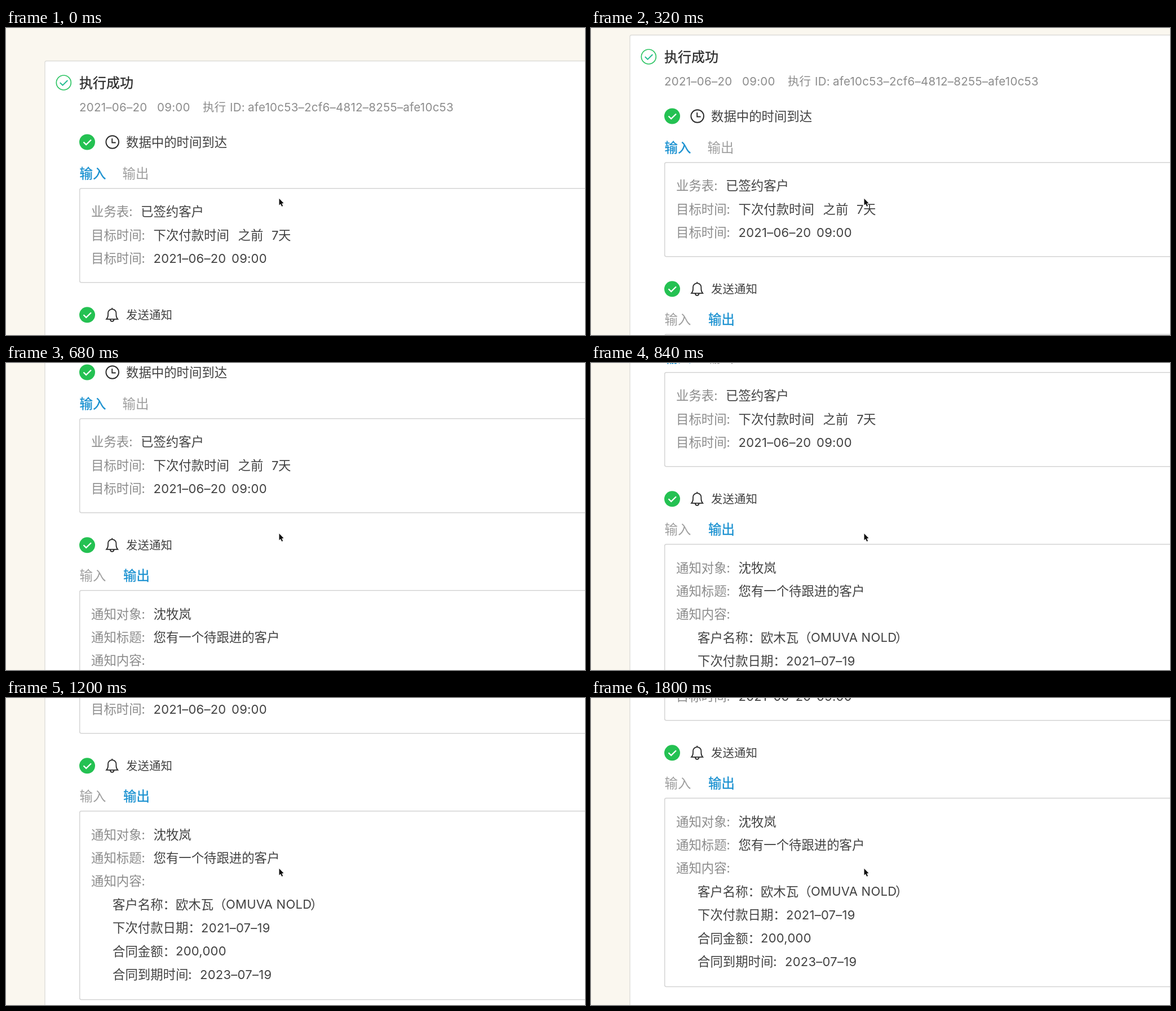
An HTML page with a canvas for the animation above (1840 ms loop, 1027 by 545 pixels).

```html
<!DOCTYPE html>
<html lang="zh-CN">
<head>
<meta charset="utf-8">
<title>执行成功</title>
<style>
html, body { margin: 0; width: 100%; height: 100%; overflow: hidden; background: #faf7ef; }
canvas { display: block; }
</style>
</head>
<body>
<canvas id="stage" width="1027" height="545"></canvas>
<script>
const W = 1027, H = 545, LOOP = 1840, STEP = 40;
const ctx = document.getElementById('stage').getContext('2d');
const HAN = '"Noto Sans CJK SC", "Noto Sans CJK", sans-serif';
const LATIN = 'Inter, "Open Sans", sans-serif';
const INK = '#424242', GRAY = '#8c8c8c', PALE = '#9f9f9f', BLUE = '#1890d0';
const GREEN = '#24c152', LINE = '#d4d4d4', PAPER = '#faf7ef';
const SMALL = 20.5;

// Scroll keys: time, offset, speed
const KEYS = [
  [0, 0, 0], [320, 46, 0.22], [520, 108, 0.41],
  [840, 268, 0.45], [1040, 346, 0.32], [1400, 412, 0]
];

function scrollAt(t) {
  for (let i = 1; i < KEYS.length; i++) {
    const [t0, p0, v0] = KEYS[i - 1], [t1, p1, v1] = KEYS[i];
    if (t > t1) continue;
    const d = t1 - t0, u = (t - t0) / d, u2 = u * u, u3 = u2 * u;
    return Math.round(p0 + (p1 - p0) * (3 * u2 - 2 * u3)
      + d * (v0 * (u3 - 2 * u2 + u) + v1 * (u3 - u2)));
  }
  return KEYS[KEYS.length - 1][1];
}

// y is the middle of the text line
function han(str, x, y, color = INK, size = 22.4, heavy = false) {
  ctx.font = `350 ${size}px ${HAN}`;
  ctx.letterSpacing = '0px';
  ctx.fillStyle = color;
  const base = y + size * 0.375;
  ctx.fillText(str, x, base);
  if (!heavy) return;
  ctx.strokeStyle = color;
  ctx.lineWidth = 0.35;
  ctx.strokeText(str, x, base);
}

function latin(str, x, y, color = INK, size = 22) {
  ctx.font = `400 ${size}px ${LATIN}`;
  ctx.letterSpacing = '0.25px';
  ctx.fillStyle = color;
  ctx.fillText(str, x, y + size * 0.366);
}

function line(points, color, width) {
  ctx.beginPath();
  points.forEach(([x, y]) => ctx.lineTo(x, y));
  ctx.strokeStyle = color;
  ctx.lineWidth = width;
  ctx.stroke();
}

function circle(x, y, r) {
  ctx.beginPath();
  ctx.arc(x, y, r, 0, Math.PI * 2);
}

function box(x, y, h, color, width, r) {
  ctx.beginPath();
  ctx.roundRect(x, y, W, h, r);
  ctx.fillStyle = '#fff';
  ctx.fill();
  ctx.strokeStyle = color;
  ctx.lineWidth = width;
  ctx.stroke();
}

function tick(x, y, color, width) {
  line([[x - 6.5, y], [x - 1.8, y + 4.6], [x + 7, y - 4]], color, width);
}

function doneMark(y) {
  circle(144, y, 14);
  ctx.fillStyle = GREEN;
  ctx.fill();
  tick(144, y, '#fff', 2.3);
}

function clock(x, y) {
  circle(x, y, 11.3);
  ctx.strokeStyle = '#2b2b2b';
  ctx.lineWidth = 1.9;
  ctx.stroke();
  line([[x - 0.5, y - 6.5], [x - 0.5, y + 1], [x + 6, y + 1]], '#2b2b2b', 1.9);
}

function bell(x, y) {
  ctx.strokeStyle = '#2b2b2b';
  ctx.lineWidth = 1.8;
  ctx.beginPath();
  ctx.moveTo(x - 10, y + 7.5);
  ctx.lineTo(x + 10, y + 7.5);
  ctx.quadraticCurveTo(x + 7.2, y + 4.5, x + 7.2, y);
  ctx.lineTo(x + 7.2, y - 3);
  ctx.bezierCurveTo(x + 7.2, y - 12.5, x - 7.2, y - 12.5, x - 7.2, y - 3);
  ctx.lineTo(x - 7.2, y);
  ctx.quadraticCurveTo(x - 7.2, y + 4.5, x - 10, y + 7.5);
  ctx.closePath();
  ctx.moveTo(x, y - 10);
  ctx.lineTo(x, y - 12.5);
  ctx.moveTo(x - 3.4, y + 8);
  ctx.quadraticCurveTo(x - 2.8, y + 11.6, x, y + 11.6);
  ctx.quadraticCurveTo(x + 2.8, y + 11.6, x + 3.4, y + 8);
  ctx.stroke();
}

function cursor(x, y) {
  ctx.beginPath();
  [[0, 0], [0, 11.7], [2.6, 9.4], [4.6, 14], [6.6, 13.1], [4.7, 8.7], [8, 8.3]]
    .forEach(([dx, dy]) => ctx.lineTo(x + dx, y + dy));
  ctx.closePath();
  ctx.strokeStyle = '#fff';
  ctx.lineWidth = 1.8;
  ctx.stroke();
  ctx.fillStyle = '#111';
  ctx.fill();
}

function header() {
  circle(102.3, 97, 13);
  ctx.strokeStyle = '#2fc565';
  ctx.lineWidth = 1.7;
  ctx.stroke();
  tick(102.3, 97, '#22bd90', 2);
  han('执行成功', 130, 97, '#2b2b2b', 24, true);
  latin('2021–06–20', 130, 140, GRAY, SMALL);
  latin('09:00', 268, 140, GRAY, SMALL);
  han('执行', 349, 140, GRAY, SMALL);
  latin('ID:', 397, 140, GRAY, SMALL);
  latin('afe10c53–2cf6–4812–8255–afe10c53', 429, 140, GRAY, SMALL);
}

function trigger() {
  doneMark(202.5);
  clock(188.7, 202.5);
  han('数据中的时间到达', 213, 203);
  han('输入', 130.5, 258, BLUE, 23.4, true);
  han('输出', 206.5, 258, PALE, 23.4);
  box(130.7, 284.7, 167, LINE, 1.5, 3);
  han('业务表:', 151, 326, GRAY);
  han('已签约客户', 239, 326);
  han('目标时间:', 151, 367.5, GRAY);
  han('下次付款时间', 261.5, 367.5);
  han('之前', 411.5, 367.5);
  latin('7', 471, 367.5);
  han('天', 483, 367.5);
  han('目标时间:', 151, 409, GRAY);
  latin('2021–06–20', 261.5, 409);
  latin('09:00', 400, 409);
}

function notice() {
  doneMark(509.3);
  bell(188.2, 509.3);
  han('发送通知', 213, 509.3, INK, SMALL);
  han('输入', 130.5, 563.5, PALE, 23.4);
  han('输出', 208, 563.5, BLUE, 23.4, true);
  box(130.7, 589.8, 334.6, LINE, 1.5, 3);
  const row = i => 631.2 + i * 41.4;
  han('通知对象:', 151, row(0), GRAY);
  han('沈牧岚', 261.5, row(0));
  han('通知标题:', 151, row(1), GRAY);
  han('您有一个待跟进的客户', 261.5, row(1));
  han('通知内容:', 151, row(2), GRAY);
  han('客户名称：欧木瓦（', 189, row(3));
  latin('OMUVA NOLD', 390, row(3));
  han('）', 540, row(3));
  han('下次付款日期：', 189, row(4));
  latin('2021–07–19', 346, row(4));
  han('合同金额：', 189, row(5));
  latin('200,000', 301, row(5));
  han('合同到期时间:', 189, row(6));
  latin('2023–07–19', 344, row(6));
}

function draw(t) {
  ctx.fillStyle = PAPER;
  ctx.fillRect(0, 0, W, H);
  ctx.save();
  ctx.translate(0, -scrollAt(t));
  box(69, 58.5, 1200, '#dcdcd8', 1.3, 3);
  header();
  trigger();
  notice();
  ctx.restore();
  cursor(484.5, 302.8);
}

const start = performance.now();
function frame() {
  const t = (performance.now() - start) % LOOP;
  draw(Math.floor(t / STEP) * STEP);
  requestAnimationFrame(frame);
}
frame();
</script>
</body>
</html>
```
